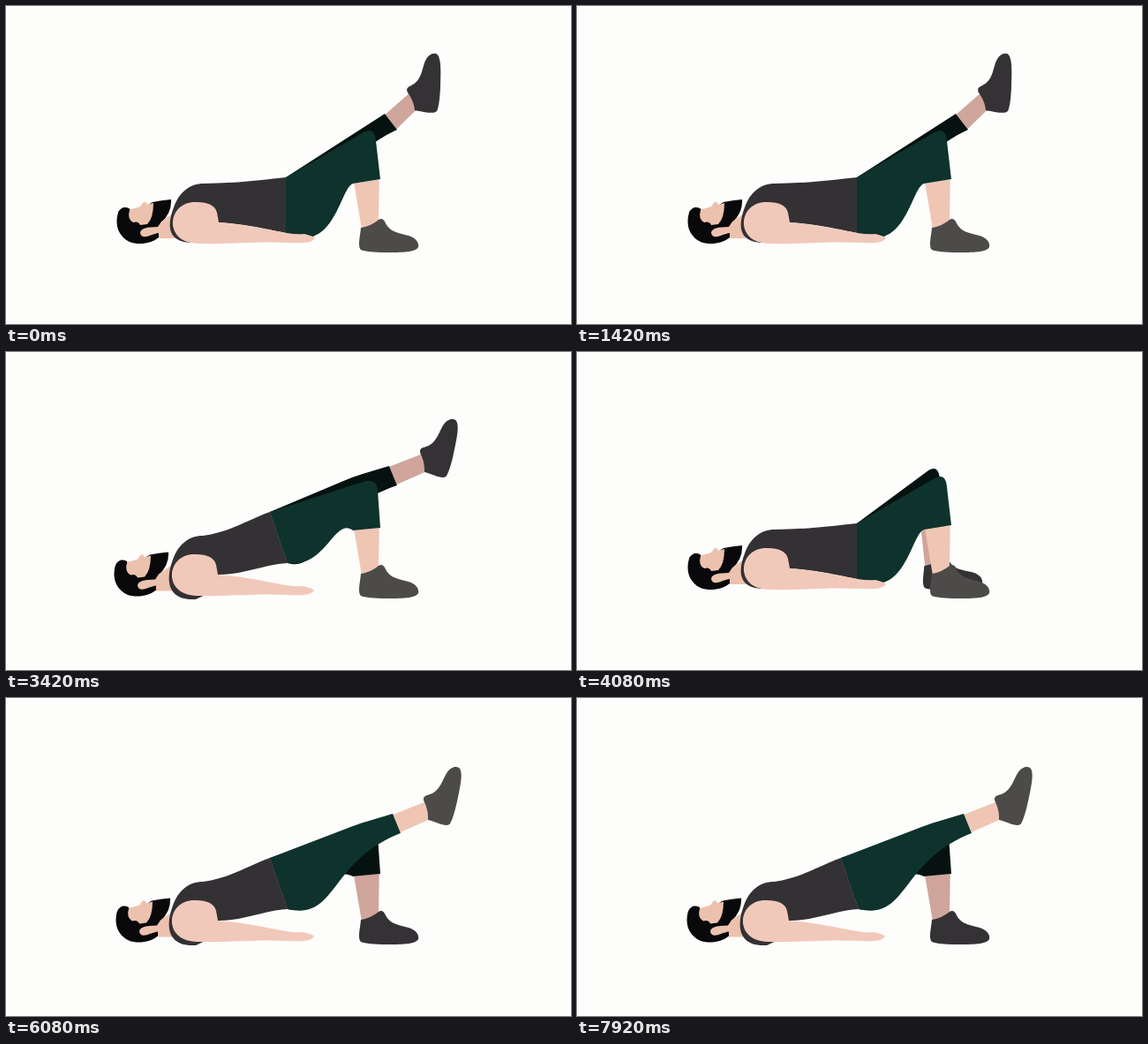
An HTML page that plays this animation: 640 px wide and 360 px high, repeating every 8 s.

```html
<!DOCTYPE html>
<html lang="en">
<head>
<meta charset="utf-8">
<title>Single-leg bridge</title>
<style>
html, body { margin: 0; width: 100%; height: 100%; overflow: hidden; background: #fdfdfc; }
svg { display: block; width: 100vw; height: 100vh; }
.hair { fill: #09080a; }
.face { fill: #ecc2ae; }
.arm { fill: #f1c9bb; }
.vest { fill: #343134; }
.near .short { fill: #0e322c; }
.near .shin { fill: #efc6b4; }
.near .shoe { fill: #4c4b49; }
.far .short { fill: #06120f; }
.far .shin { fill: #cfa59c; }
.far .shoe { fill: #343234; }
</style>
</head>
<body>
<svg viewBox="0 0 640 360">
  <defs>
    <!-- heel at the origin -->
    <path id="shoe" d="M2-25C10-26 17-30 22-34Q27-37 30-30C36-19 46-19 56-16C65-13 68-8 67-3C64 3 48 3 30 3C18 3 6 2 2 0C-2-4 1-14 2-25Z"/>
  </defs>
  <g id="head">
    <path class="hair" d="M133 228Q144 227 140 238L166 222Q176 220 187 219Q188 234 176 245L173 262C165 269 150 271 140 267C128 261 124 250 126 238Q127 230 133 228Z"/>
    <path class="face" d="M140 231C145 228 150 229 153 226C156 220 159 221 160 225L167 223Q167 240 160 247L152 248Q150 243 144 245Q137 241 140 231Z"/>
    <path class="face" d="M176 244L192 233V263H173V257C165 258 154 266 152 257Q152 250 172 250Z"/>
  </g>
  <g class="far" id="far"><path class="shin"/><use class="shoe" href="#shoe"/><path class="short"/></g>
  <g class="near" id="near"><path class="shin"/><use class="shoe" href="#shoe"/><path class="short"/></g>
  <g id="body">
    <path class="vest" id="vest"/>
    <path class="arm" d="M189 248C188 232 200 221 216 222Q236 222 239 234L241 245C270 247 295 253 318 257Q330 259 338 258Q350 261 350 263C347 268 335 269 322 268C285 266 250 270 220 269C202 269 191 262 189 248Z"/>
  </g>
</svg>
<script>
const $ = id => document.getElementById(id);
const lerp = (a, b, u) => a + (b - a) * u;
const mix = (a, b, u) => a.map((v, i) => lerp(v, b[i], u));
const add = (a, b, k = 1) => a.map((v, i) => v + b[i] * k);
const smooth = (a, b, t) => {
  const x = Math.min(1, Math.max(0, (t - a) / (b - a)));
  return x * x * (3 - 2 * x);
};

// Key poses: knee, two hem ends, two controls of the back of the thigh, heel; turn of the foot.
const pose = (turn, ...points) => ({ turn, points });
const blend = (a, b, u) => ({
  turn: lerp(a.turn, b.turn, u),
  points: a.points.map((p, i) => mix(p, b.points[i], u))
});
const floor = [
  pose(0, [417, 136], [424, 196], [393, 201], [378, 206], [372, 283], [400, 276]),
  pose(0, [420, 142], [424, 199], [393, 202], [372, 186], [362, 246], [400, 276])];
const raised = [
  pose(-88, [405, 142], [433, 124], [447, 142], [355, 190], [395, 295], [492, 123]),
  pose(-78, [398, 143], [438, 131], [447, 153], [365, 185], [376, 252], [502, 145])];
const bent = pose(-10, [378, 92], [398, 150], [369, 160], [362, 190], [376, 280], [365, 236]);

// The far leg sits a little back when raised and hides its inner edge.
const far = { el: $("far"), shift: [-4, -2], inset: [-12, 0] };
const near = { el: $("near"), shift: [0, 0], inset: [0, 0] };

function drawLeg(leg, lift, u, top, bottom) {
  const end = blend(...(lift < 1 ? floor : raised), u);
  const { turn, points } = blend(bent, end, Math.abs(lift - 1));
  const [knee, hem1, hem2, back1, back2, heel] = points.map(p => add(p, leg.shift, lift / 2));
  const a = turn * Math.PI / 180, c = Math.cos(a), s = Math.sin(a);
  const ankle = (x, y) => add(heel, [x * c - y * s, x * s + y * c]);
  const [shin, shoe, short] = leg.el.children;
  shin.setAttribute("d", `M${mix(hem1, hem2, .04)}L${ankle(22, -31)}L${ankle(10, -20)}L${ankle(3, -23)}L${mix(hem2, hem1, .04)}Z`);
  shoe.setAttribute("transform", `translate(${heel}) rotate(${turn})`);
  short.setAttribute("d", `M${top}L${mix(top, knee, .87)}Q${knee} ${mix(knee, hem1, .25)}L${hem1}L${hem2}` +
    `C${add(back1, leg.inset)} ${add(back2, leg.inset)} ${bottom}Z`);
}

// Hip lifts: rest low, rise, short hold, fall.
const REP = 838, SETS = [570, 4905];
function hips(t) {
  const n = (t - (t < SETS[1] ? SETS[0] : SETS[1])) / REP;
  if (n < 0 || n > 4) return 0;
  return smooth(.22, .4, .5 - Math.abs(n % 1 - .5));
}

function draw(t) {
  const u = hips(t);
  const farLift = 2 - 2 * smooth(3740, 4170, t);
  const nearLift = 2 * smooth(4170, 4700, t);
  const slide = [1.5 * nearLift * (1 - u), 1.2 * nearLift * (1 - u)];
  const top = add(mix([317, 194], [299, 181], u), slide);
  const bottom = add(mix([317, 257], [319, 239], u), slide);
  drawLeg(far, farLift, u, top, bottom);
  drawLeg(near, nearLift, u, top, bottom);

  // Vest: fixed shoulder, waist follows the hips.
  const move = add(slide, [-u, 7 * u]);
  const t1 = add(top, move, -1), b1 = add(bottom, move, -1);
  $("vest").setAttribute("d", `M216 ${268 + 5 * u}C180 ${270 + 5 * u} 183 246 190 228C196 211 208 201 224 201` +
    `C256 ${201 - 5 * u} ${add(t1, [-27, 3 + 7 * u])} ${t1}L${b1}C${add(b1, [-20, 4 * u - 4])} 268 246 239 245V262Z`);
  $("body").setAttribute("transform", `translate(${move})`);
  $("head").setAttribute("transform", `translate(${add(slide, [nearLift * u - 3 * u, 7.5 * u])})`);
}

const LOOP = 8000, TICK = 1000 / 12;
function frame() {
  const t = performance.now() % LOOP;
  draw(Math.floor((t + 4) / TICK) * TICK % LOOP);
  requestAnimationFrame(frame);
}
frame();
</script>
</body>
</html>
```
